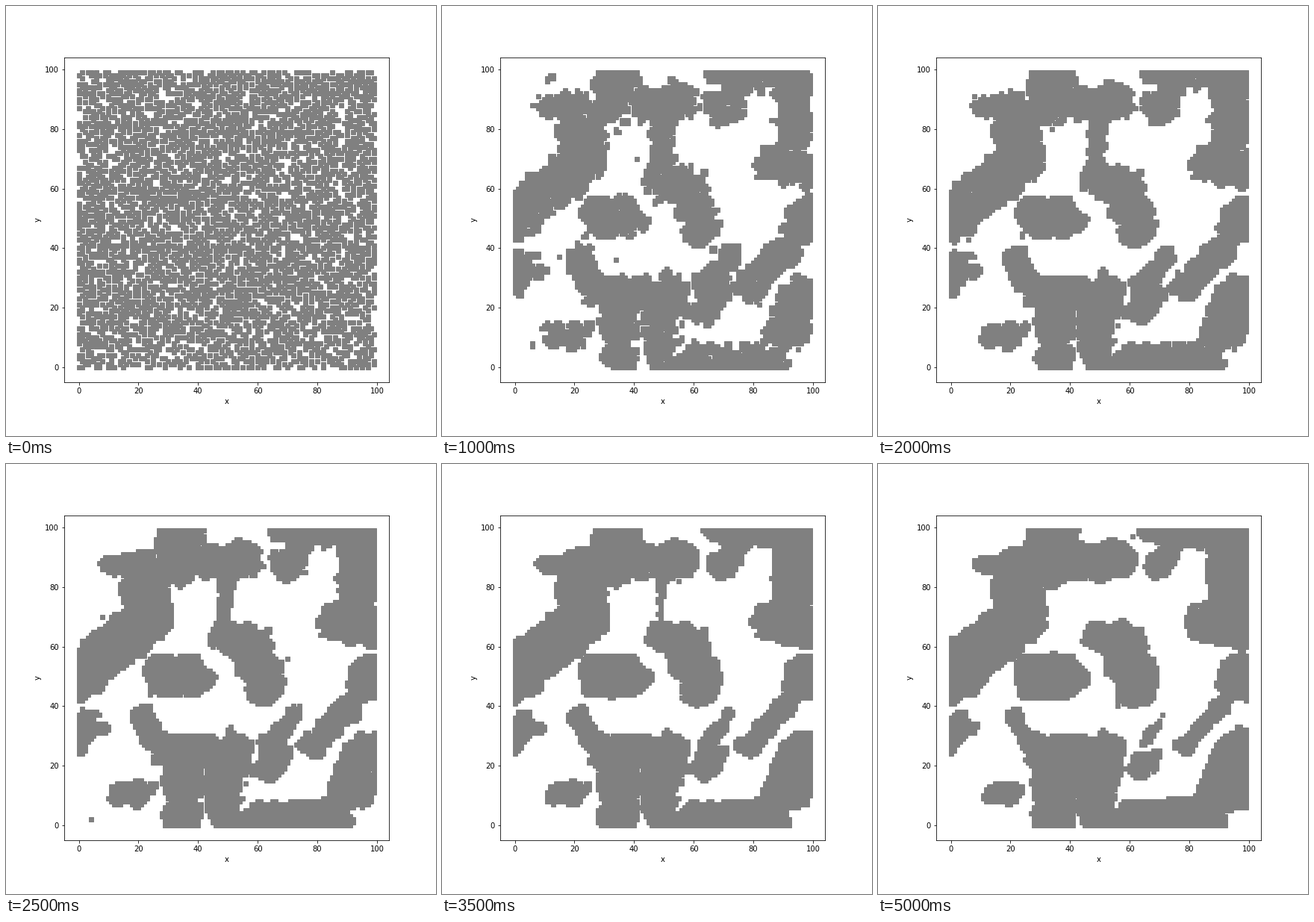
Animation of 576 by 576 pixels, one loop 5.5 s. Source, as a matplotlib script:

```python
import numpy as np
import matplotlib.pyplot as plt
from matplotlib.animation import FuncAnimation

N = 100
FRAMES = 11
STEP_MS = 500
CRITICAL_R = 5.5     # thinner domains shrink, thicker ones grow
RATE = 0.35

gx, gy = np.meshgrid(np.arange(N), np.arange(N))

# Domains as round strokes: x0, y0, x1, y1, radius
STROKES = [
    (0, 50, 24, 71, 8), (23, 70, 22, 86, 7.5), (12, 88, 22, 87, 4.5),
    (32, 89, 36, 104, 8), (42, 89, 55, 90, 6),
    (49, 68, 49, 85, 2),
    (49, 64, 57, 59, 5), (58, 60, 62, 47, 6.5),
    (28, 50, 38, 50, 6.5),
    (0, 29, 4, 33, 5), (15, 11, 20, 11, 4.7),
    (21, 36, 25, 29, 4), (29, 26, 53, 25, 5.5),
    (35, 3, 35, 20, 6.3), (49, 3, 49, 20, 6.3), (58, 0, 84, 1, 7),
    (92, 14, 97, 23, 8.5),
    (63, 20, 67, 21, 4.6), (64, 27, 71, 37, 3),
    (79, 27, 95, 45, 4), (97, 50, 99, 50, 7.5),
    (87, 69, 98, 66, 6.8), (93, 79, 95, 98, 7),
    (72, 104, 96, 104, 9.5), (70, 87, 74, 94, 4.5),
]


def distance(x0, y0, x1, y1):
    """Distance of every cell from a line segment."""
    dx, dy = x1 - x0, y1 - y0
    s = ((gx - x0) * dx + (gy - y0) * dy) / (dx * dx + dy * dy)
    s = np.clip(s, 0, 1)
    return np.hypot(gx - x0 - s * dx, gy - y0 - s * dy)


def blur(a, times=1):
    for _ in range(times):
        for axis in (0, 1):
            a = a + 0.5 * (np.roll(a, 1, axis) + np.roll(a, -1, axis))
    return a / a.std()


rng = np.random.default_rng(7)
white = rng.standard_normal((N, N))
soft = blur(white)
wide = blur(rng.standard_normal((N, N)), 4)
domains = [(distance(*ends), r) for *ends, r in STROKES]


def field(t):
    """Signed distance to the domains, coarsening with time."""
    grown = [r + RATE * min(r - CRITICAL_R, 1) * (t - 2.5) - d
             for d, r in domains]
    return np.clip(np.max(grown, axis=0), -3, 3)


def spins(i):
    t = i * STEP_MS / 1000
    order = min(t, 1)
    pull = order ** 1.8
    rough = order * np.exp(-0.6 * (t - 1))
    value = (pull * (field(t) + 0.7 * wide)
             + rough * soft + (1 - order) * white)
    flips = np.random.default_rng(i).random((N, N)) < 3e-4
    return (value > 0) ^ flips


fig = plt.figure(figsize=(8, 8), dpi=72, facecolor="white")
ax = fig.add_axes([0.135, 0.125, 0.755, 0.755])
ax.set(xlim=(-4.95, 103.95), ylim=(-4.95, 103.95), xlabel="x", ylabel="y")
ax.set_xticks(range(0, 101, 20))
ax.set_yticks(range(0, 101, 20))
dots, = ax.plot([], [], "s", color="gray", markersize=6)


def update(i):
    y, x = np.nonzero(spins(i))
    dots.set_data(x, y)
    return dots,


anim = FuncAnimation(fig, update, frames=FRAMES, interval=STEP_MS,
                     repeat=True, repeat_delay=0)
plt.show()
```
